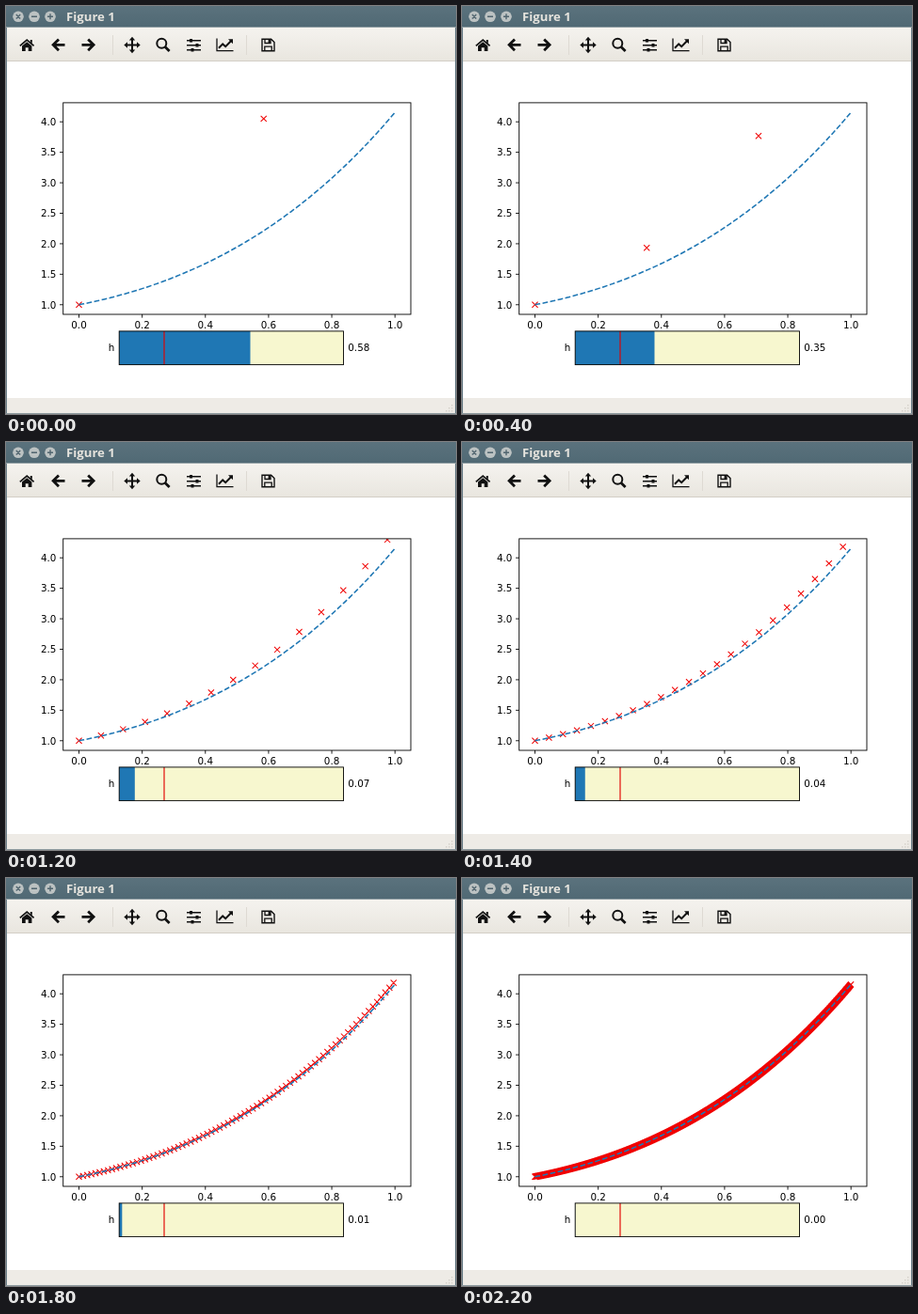
Animation, 478 px wide and 434 px high, one loop 2.39 s. Source, as an HTML page:

```html
<!DOCTYPE html>
<html lang="en">
<head>
<meta charset="utf-8">
<title>Figure 1</title>
<style>
  html, body { margin: 0; width: 100%; height: 100%; overflow: hidden; background: #fff; }
  svg { display: block; width: 478px; height: 434px; }
  .plot text { font: 10.34px "DejaVu Sans", sans-serif; fill: #000; }
  .title { font: bold 13.2px "Open Sans", sans-serif; fill: #e6e4de; }
  .spine { fill: none; stroke: #000; stroke-width: .9; }
  .icon { fill: none; stroke: #111; stroke-width: 2; }
  .solid { fill: #111; stroke: none; }
</style>
</head>
<body>
<svg viewBox="0 0 478 434">
  <defs>
    <linearGradient id="bar" x2="0" y2="1">
      <stop stop-color="#5b727d"/><stop offset="1" stop-color="#506974"/>
    </linearGradient>
    <linearGradient id="tools" x2="0" y2="1">
      <stop stop-color="#f5f3ef"/><stop offset="1" stop-color="#e9e6df"/>
    </linearGradient>
    <clipPath id="axesClip"><rect x="60.7" y="102.9" width="369.3" height="225.1"/></clipPath>
  </defs>

  <rect width="478" height="434" fill="#fff"/>
  <rect y="22" width="478" height="36" fill="url(#tools)"/>
  <rect width="478" height="22.6" fill="url(#bar)"/>
  <g stroke="#50646e" stroke-width="1.4">
    <g fill="#bcc2c2" stroke="none">
      <circle cx="13" cy="11.3" r="5.8"/><circle cx="30" cy="11.3" r="5.8"/><circle cx="47" cy="11.3" r="5.8"/>
    </g>
    <path d="M10.8 9.1l4.4 4.4m0-4.4l-4.4 4.4M27 11.3h6M44 11.3h6M47 8.3v6"/>
  </g>
  <text class="title" x="64" y="16.3">Figure 1</text>

  <path d="M0 58.5H478" stroke="#d3cec6"/>
  <path d="M113.5 31v21M255.5 31v21" stroke="#dedad3"/>

  <g class="icon">
    <path d="M14.8 42.3l7.4-6.3 7.4 6.3" stroke-width="1.7"/>
    <path class="solid" d="M17 42.6l5.2-4.4 5.2 4.4V48h-3.7v-3.8h-3V48H17zM25.8 36h2v4l-2-1.7z"/>
    <path d="M62.5 41.3H50.5M56 35.4l-5.9 5.9 5.9 5.9" stroke-width="2.8"/>
    <path d="M80.5 41.3H92.5M87.2 35.4l5.9 5.9-5.9 5.9" stroke-width="2.8"/>
    <path d="M134 35v13M127.5 41.5h13"/>
    <path class="solid" d="M134 32.8l3.2 3.7h-6.4zM134 50.2l3.2-3.7h-6.4zM125.3 41.5l3.7-3.2v6.4zM142.7 41.5l-3.7-3.2v6.4z"/>
    <circle cx="165.3" cy="39.7" r="5"/>
    <path d="M169 43.4l4.6 4.6" stroke-width="2.8"/>
    <path d="M192 36.7h15M192 41.7h15M192 46.7h15" stroke-width="1.5"/>
    <path d="M196.5 34.9v3.6M203 39.9v3.6M198 44.9v3.6" stroke-width="3"/>
    <path d="M224 34.5v13.2h17.5" stroke-width="1.3"/>
    <path d="M226 44.8l4.2-4.4 3 2.8 6-6.2" stroke-width="2"/>
    <path class="solid" d="M236 35.2h5v5z"/>
    <path d="M272 35.2h9.6l3.4 3.4v9.2h-13z" stroke-width="1.4"/>
    <path d="M275 35.5v4h6v-4M274.8 47.5v-4.3h7.4v4.3" stroke-width="1.3"/>
    <path class="solid" d="M278.6 35.5h2.2v3.6h-2.2z"/>
  </g>

  <g class="plot">
    <g id="ticks"></g>
    <g clip-path="url(#axesClip)" fill="none">
      <path id="marks" stroke="#f00000" stroke-width="1.03"/>
      <path id="curve" stroke="#1f77b4" stroke-width="1.55" stroke-dasharray="5.74 2.48"/>
    </g>
    <rect class="spine" x="60.7" y="102.9" width="369.3" height="225.1"/>
    <rect x="120.2" y="345.9" width="238.3" height="35.7" fill="#f7f7cf"/>
    <rect id="fill" x="120.2" y="345.9" height="35.7" fill="#1f77b4"/>
    <path d="M168 345.9v35.7" stroke="#e00000" stroke-opacity=".72" stroke-width="1.6"/>
    <rect class="spine" x="120.2" y="345.9" width="238.3" height="35.7"/>
    <text x="115.2" y="366.7" text-anchor="end">h</text>
    <text id="value" x="363.3" y="366.7"></text>
  </g>

  <rect y="417" width="478" height="17" fill="#eeebe6"/>
  <g fill="#d6d2cb">
    <path d="M473 424h1.5v1.5H473zM470 427h1.5v1.5H470zM473 427h1.5v1.5H473zM467 430h1.5v1.5H467zM470 430h1.5v1.5H470zM473 430h1.5v1.5H473z"/>
  </g>
  <path d="M.5 23v411M477.5 23v411" stroke="#6c808a"/>
  <path d="M0 433.5H478" stroke="#8d9a9f"/>
</svg>

<script>
  const LOOP = 2390;
  // [start in ms, step size h]
  const STEPS = [
    [0, .5845], [70, .556], [130, .519], [200, .478], [270, .438], [330, .394], [400, .3537],
    [600, .251], [800, .201], [1000, .101], [1200, .0697],
    [1400, .0443], [1470, .035], [1530, .0256], [1600, .01934], [1670, .0162], [1800, .0131],
    [2000, .00997], [2070, .0068], [2200, .0006]
  ];

  const byId = id => document.getElementById(id);
  const px = x => 77.5 + x * 335.7;
  const py = y => 317.77 - (y - 1) * 64.86;

  // y' = y + 2x, y(0) = 1
  const exact = x => 3 * Math.exp(x) - 2 * x - 2;
  // Closed form of the n-th implicit Euler step
  const euler = (n, h) => 3 * (1 - h) ** -n - 2 * n * h - 2;

  function drawTicks() {
    let out = "";
    for (let i = 0; i <= 5; i++) {
      const x = px(i / 5);
      out += `<path class="spine" d="M${x} 328v3.6"/>` +
             `<text x="${x}" y="343.3" text-anchor="middle">${(i / 5).toFixed(1)}</text>`;
    }
    for (let v = 1; v <= 4; v += .5) {
      const y = py(v);
      out += `<path class="spine" d="M60.7 ${y}h-3.6"/>` +
             `<text x="53.4" y="${y + 3.8}" text-anchor="end">${v.toFixed(1)}</text>`;
    }
    byId("ticks").innerHTML = out;
  }

  function drawCurve() {
    const points = Array.from({ length: 101 }, (_, i) => `${px(i / 100)} ${py(exact(i / 100))}`);
    byId("curve").setAttribute("d", "M" + points.join("L"));
  }

  function showStep(h) {
    const r = 3.1;
    let d = "";
    for (let n = 0; n * h <= 1; n++) {
      const x = px(n * h), y = py(euler(n, h));
      d += `M${x - r} ${y - r}l${2 * r} ${2 * r}m0 ${-2 * r}l${-2 * r} ${2 * r}`;
    }
    byId("marks").setAttribute("d", d);
    byId("fill").setAttribute("width", h * 238.3);
    byId("value").textContent = h.toFixed(2);
  }

  const start = performance.now();
  let shown;

  function tick() {
    const t = (performance.now() - start) % LOOP;
    const step = STEPS.findLast(([from]) => from <= t);
    if (step !== shown) showStep((shown = step)[1]);
    requestAnimationFrame(tick);
  }

  drawTicks();
  drawCurve();
  tick();
</script>
</body>
</html>
```
